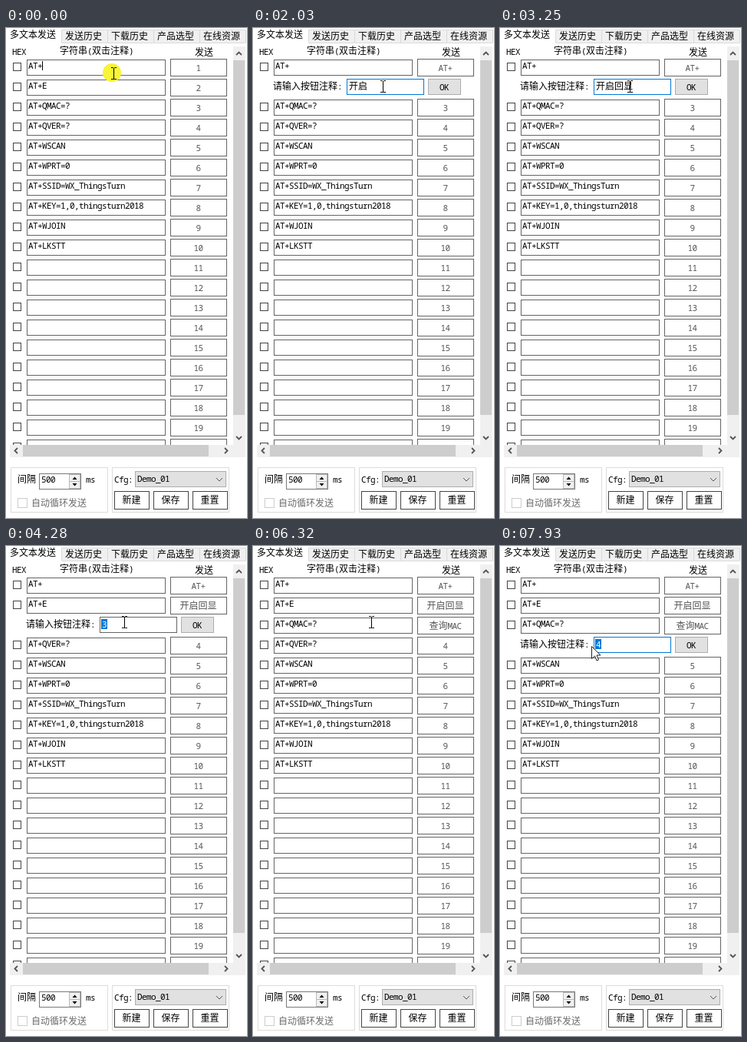
Animation, 314 px wide and 637 px high, one loop 8000 ms. Source, as an HTML page:

```html
<!DOCTYPE html>
<html lang="zh-CN">
<head>
<meta charset="utf-8">
<style>
html, body { margin: 0; width: 100%; height: 100%; overflow: hidden; background: #fff; }
svg { display: block; }
text { font: 12px "Noto Sans CJK SC", "Noto Sans CJK", sans-serif; white-space: pre; }
.m { font: 11px "Noto Sans Mono", monospace; letter-spacing: -.6px; }
</style>
</head>
<body>
<svg id="stage" width="314" height="637">
  <svg width="314" height="542" id="list"></svg>
  <g id="frame"></g>
  <g id="overlay"></g>
</svg>
<script>
const BLUE = '#0078d7', LINE = '#646464', GREY = '#555', FACE = '#f0f0f0';
const commands = ['AT+', 'AT+E', 'AT+QMAC=?', 'AT+QVER=?', 'AT+WSCAN', 'AT+WPRT=0',
  'AT+SSID=WX_ThingsTurn', 'AT+KEY=1,0,thingsturn2018', 'AT+WJOIN', 'AT+LKSTT'];
const notes = ['AT+', '开启回显', '查询MAC'];
const HINT = '点击前往设置页面开启模糊音';

// time, finished notes, dialog value (null = closed), candidates, pointer x, y, pointer kind
const steps = [
  [0, 0, null, '', 140, 59, 'click'],
  [200, 0, '1', '', 140, 59],
  [570, 1, null, '', 140, 59],
  [990, 1, null, '', 162, 74],
  [1200, 1, null, '', 169, 76, 'click'],
  [1400, 1, '2', '', 169, 76],
  [1610, 1, 'k', '看 快 开', 169, 76],
  [1820, 1, 'kaiqi', '开启 开期', 169, 76],
  [2030, 1, '开启', '', 169, 76],
  [2250, 1, '开启h', '和 会 好', 169, 76],
  [2450, 1, '开启hui', '会 回 惠', 169, 76, 'hint'],
  [2650, 1, '开启huix', '回想 回旋', 169, 76, 'hint'],
  [2850, 1, '开启huixian', '回显 回县', 169, 76, 'hint'],
  [3250, 1, '开启回显', '', 169, 76],
  [3460, 2, null, '', 169, 76],
  [3660, 2, null, '', 158, 90],
  [3870, 2, null, '', 154, 99],
  [4070, 2, null, '', 154, 99, 'click'],
  [4280, 2, '3', '', 154, 99],
  [4700, 2, 'ch', '吃 出 场', 154, 99],
  [4900, 2, 'chax', '查询 查下', 154, 99],
  [5100, 2, 'chaxun', '查询 查寻', 154, 99],
  [5300, 2, '查询', '', 154, 99],
  [5500, 2, '查询', 'M', 154, 99],
  [5700, 2, '查询MA', 'MA', 154, 99],
  [5900, 2, '查询MAC', 'MAC', 154, 99],
  [6110, 2, '查询MAC', '', 154, 99],
  [6320, 3, null, '', 154, 99],
  [6930, 3, null, '', 220, 112],
  [7130, 3, null, '', 288, 130, 'arrow'],
  [7330, 3, null, '', 190, 129],
  [7530, 3, null, '', 130, 129, 'click'],
  [7730, 3, '4', '', 124, 130],
  [7930, 3, '4', '', 119, 130, 'arrow']
];

const $ = id => document.getElementById(id);
const fill = (x, y, w, h, c) => `<rect x="${x}" y="${y}" width="${w}" height="${h}" fill="${c}"/>`;
const box = (x, y, w, h, stroke = LINE, bg = '#fff') =>
  `<rect x="${x + .5}" y="${y + .5}" width="${w - 1}" height="${h - 1}" fill="${bg}" stroke="${stroke}"/>`;
const path = (d, stroke = '#000', extra = '') => `<path d="${d}" fill="none" stroke="${stroke}" ${extra}/>`;
// y is the middle of the line; Latin runs use the narrow fixed-width face
const text = (x, y, s, c = '#000', anchor = 'start') =>
  `<text x="${x}" y="${y + 4}" fill="${c}" text-anchor="${anchor}">` +
  s.replace(/[ -~]+/g, '<tspan class="m">$&</tspan>') + '</text>';
const label = (x, y, s, c, size) => `<text x="${x}" y="${y}" fill="${c}" style="font-size:${size}px">${s}</text>`;
const button = (x, y, w, h, s, c, stroke, bg) =>
  box(x, y, w, h, stroke, bg) + text(x + w / 2 - .5, y + h / 2, s, c, 'middle');

function drawFrame() {
  let s = fill(73, 2, 239, 18, FACE);
  s += text(5, 9, '多文本发送');
  ['发送历史', '下载历史', '产品选型', '在线资源'].forEach((name, i) => {
    s += path(`M${72.5 + 60 * i} 19.5V2.5h60V19.5`, '#d9d9d9') + text(77 + 60 * i, 11, name);
  });
  s += fill(73, 19, 239, 1, '#dcdcdc');
  s += text(8, 31, 'HEX') + text(70, 30, '字符串(双击注释)') + text(246, 32, '发送');

  // scrollbars
  s += fill(296, 24, 16, 534, FACE) + fill(5, 542, 291, 16, FACE);
  s += fill(296, 42, 15, 461, '#cdcdcd') + fill(22, 542, 242, 15, '#cdcdcd');
  s += path('M300 35l3.5-3.5 3.5 3.5M300 531l3.5 3.5 3.5-3.5M15 546l-3.5 3.5 3.5 3.5M285 546l3.5 3.5-3.5 3.5',
    GREY, 'stroke-width="1.8"');

  // settings
  s += box(6, 571, 127, 59, '#dcdcdc') + box(138, 571, 153, 59, '#dcdcdc');
  s += text(15, 587, '间隔') + box(43, 579, 55, 21, '#7a7a7a') + text(46, 587, '500') + text(104, 587, 'ms');
  s += box(82, 580, 15, 10, '#bbb', FACE) + box(82, 589, 15, 10, '#bbb', FACE);
  s += '<path d="M86.500 587l3-3.500 3 3.500zM86.500 592l3 3.500 3-3.500z"/>';
  s += box(15, 611, 13, 13, '#ccc') + text(33, 618, '自动循环发送', '#6d6d6d');
  s += text(141, 587, 'Cfg:') + box(168, 576, 119, 21, '#adadad', '#e1e1e1') + text(171, 586, 'Demo_01');
  s += path('M274 585l4 4 4-4', GREY);
  ['新建', '保存', '重置'].forEach((name, i) => s += button(141 + 51 * i, 602, 46, 24, name, '#000', '#444'));
  $('frame').innerHTML = s;
}

function row(i, done) {
  const y = 40 + 26 * i;
  return box(9, y + 5, 11, 11, '#444') + box(27, y + 1, 181, 21) + text(29, y + 9, commands[i] || '') +
    button(214, y, 74, 23, i < done ? notes[i] : String(i + 1), GREY);
}

function dialog(i, value) {
  const y = 40 + 26 * i, picked = /^\d$/.test(value);
  return text(26, y + 10, '请输入按钮注释:') + box(122, y, 101, 21, i == 2 ? LINE : BLUE) +
    (picked ? fill(124, y + 3, 8, 13, BLUE) : '') + text(125, y + 10, value, picked ? '#fff' : '#000') +
    button(228, y, 43, 21, 'OK', '#000', '#adadad', '#e1e1e1');
}

function candidates(y, words, hint) {
  const raw = /^[A-Z]/.test(words), right = raw ? 225 + 16 * words.length : 314;
  const h = hint ? 70 : 44;
  let s = fill(146, y, right - 146, h, '#fff') + fill(146, y, right - 146, 1, BLUE) +
    fill(146, y + h - 1, right - 146, 1, BLUE) + fill(146, y, 1, h, BLUE);
  let x = 146;
  words.split(' ').forEach((word, i) => {
    const w = raw ? 34 + 16 * word.length : 43 + 17 * word.length;
    if (!i) s += fill(x, y, w + (raw ? 0 : 1), 44, BLUE);
    if (raw) s += label(x + 17, y + 29, word, '#fff', 19);
    else s += label(x + 17, y + 29, i + 1, i ? '#777' : '#fff', 12) +
      label(x + 28, y + 29, word, i ? '#000' : '#fff', 17);
    x += w;
  });
  if (hint) s += fill(147, y + 44, 167, 1, '#ddd') + label(155, y + 61, HINT, '#777', 13);
  return s;
}

function pointer(x, y, kind) {
  if (kind == 'arrow')
    return `<path d="M${x + .5} ${y + .5}v16l4-3.500 2.500 6 2.500-1-2.500-6h5z" fill="#fff" stroke="#222"/>`;
  const halo = kind == 'click' ? `<circle cx="${x - 2}" cy="${y - 1}" r="12" fill="#f8f436"/>` : '';
  return halo + path(`M${x - 3} ${y - 7.5}h2.500l1 1 1-1h2.500M${x + .5} ${y - 7}v15M${x - 3} ${y + 7.5}h2.500l1-1 1 1h2.500`);
}

function draw([t, done, value, words, x, y, kind]) {
  let s = '';
  for (let i = 0; i < 20; i++) s += value != null && i == done ? dialog(i, value) : row(i, done);
  if (!t) s += fill(47, 43, 1, 12, '#000');
  if (words == 'M') s += path('M148.500 97v10h4');
  $('list').innerHTML = s;
  $('overlay').innerHTML = (words ? candidates(60 + 26 * done, words, kind == 'hint') : '') + pointer(x, y, kind);
}

let shown;
function tick() {
  const t = performance.now() % 8000;
  const step = steps.findLast(s => s[0] <= t);
  if (step != shown) draw(shown = step);
  requestAnimationFrame(tick);
}
drawFrame();
tick();
</script>
</body>
</html>
```
